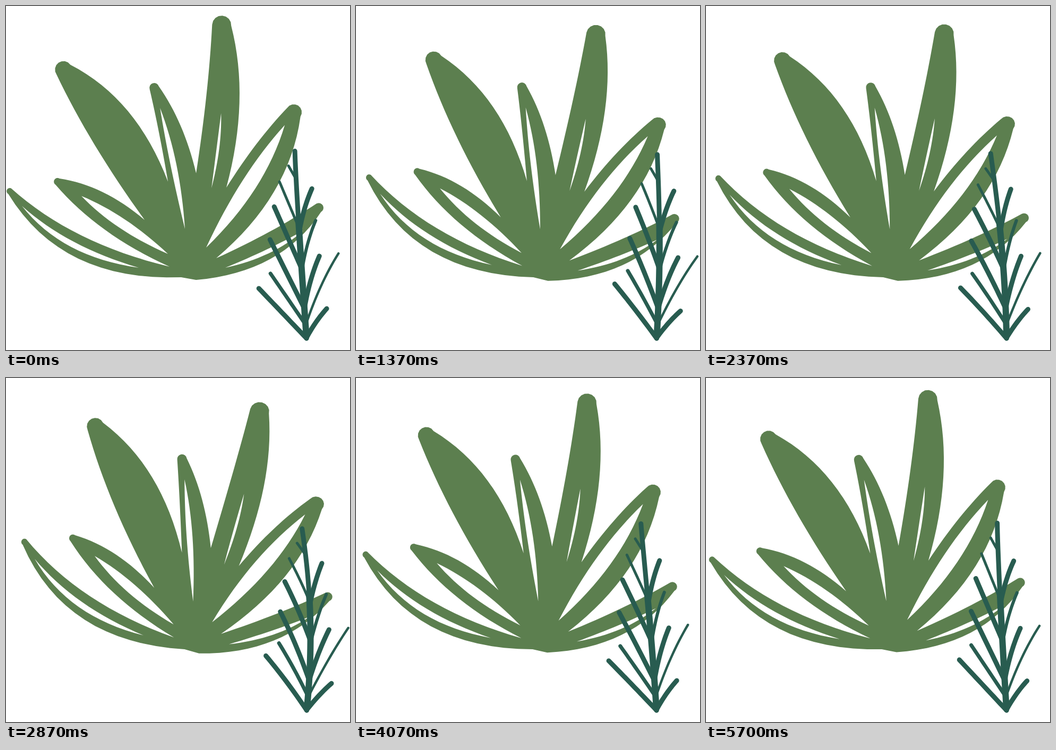
An HTML page for the animation above (5.73 s loop, 648 by 648 pixels).

```html
<!DOCTYPE html>
<html lang="en">
<head>
<meta charset="utf-8">
<title>Swaying plants</title>
<style>
  html, body { margin: 0; width: 100%; height: 100%; overflow: hidden; background: #fff; }
  svg { display: block; width: 100vw; height: 100vh; }
</style>
</head>
<body>
<svg viewBox="0 0 648 648">
  <path id="bush" fill="#5c7f4f"/>
  <path id="gaps" fill="#fff"/>
  <g id="sprig" fill="none" stroke="#285c50" stroke-linecap="round" stroke-linejoin="round"></g>
</svg>
<script>
const LOOP = 5730, FRAME = 1000 / 30;
const BUSH_PERIOD = 1800, SPRIG_PERIOD = 1930;

// Points where neighbouring leaves meet, clockwise from the foot.
const valleys = [[330, 511], [308, 491], [261, 403], [305, 331], [358, 315], [415, 342], [396, 475], [358, 516]];

// bends: bulge of the left and right edge as a share of the length, positive to the left.
const leaves = [
  { tip: [7, 349], radius: 6, bends: [0.29, 0.126], gap: { root: [250, 493], tip: [30, 377], bends: [0.2, 0.112] } },
  { tip: [97, 331], radius: 7, bends: [0.11, -0.14], gap: { root: [305, 467], tip: [142, 358], bends: [0.1, -0.09] } },
  { tip: [108, 120], radius: 16, bends: [0.045, -0.19] },
  { tip: [279, 154], radius: 9, bends: [-0.015, -0.095], gap: { root: [337, 420], tip: [290, 192], bends: [0.02, -0.075] } },
  { tip: [406, 36], radius: 18, bends: [-0.025, -0.13], gap: { root: [387, 343], tip: [405, 202], bends: [0, -0.07] } },
  { tip: [542, 200], radius: 15, bends: [0.05, -0.19], gap: { root: [377, 455], tip: [525, 224], bends: [0.075, -0.13] } },
  { tip: [589, 380], radius: 9, bends: [-0.04, -0.24], gap: { root: [413, 493], tip: [560, 423], bends: [-0.03, -0.13] } }
];

const twigs = [
  { tip: [476, 532], foot: 626, width: 9 },
  { tip: [498, 504], foot: 600, width: 7 },
  { tip: [497, 440], foot: 570, width: 9 },
  { tip: [505, 378], foot: 495, width: 9 },
  { tip: [515, 331], foot: 418, width: 5 },
  { tip: [532, 301], foot: 326, width: 5 },
  { tip: [576, 344], foot: 425, width: 9 },
  { tip: [583, 404], foot: 500, width: 6 },
  { tip: [590, 471], foot: 570, width: 9 },
  { tip: [626, 466], foot: 602, width: 4.5 },
  { tip: [604, 570], foot: 625, width: 9 }
];

// Points of a curve from a to b, fullest a little past the middle.
function bow(a, b, bend, steps = 16) {
  const dx = b[0] - a[0], dy = b[1] - a[1];
  const control = [a[0] + 0.55 * dx + bend * dy, a[1] + 0.55 * dy - bend * dx];
  return Array.from({ length: steps + 1 }, (_, i) => {
    const t = i / steps, s = 1 - t;
    return a.map((v, k) => s * s * v + 2 * s * t * control[k] + t * t * b[k]);
  });
}

// Up the left edge, round the tip, down the right edge.
function leafEdge({ tip, radius, bends }, left, right) {
  const heading = Math.atan2(tip[1] - (left[1] + right[1]) / 2, tip[0] - (left[0] + right[0]) / 2);
  const cap = Array.from({ length: 9 }, (_, i) => {
    const angle = heading + (i / 8 - 0.5) * Math.PI;
    return [tip[0] + radius * Math.cos(angle), tip[1] + radius * Math.sin(angle)];
  });
  return [...bow(left, cap[0], bends[0]), ...cap, ...bow(right, cap[8], bends[1]).reverse()];
}

function gapEdge({ root, tip, bends }) {
  return [...bow(root, tip, bends[0]), ...bow(root, tip, bends[1]).reverse()];
}

function stemPoint(y) {
  return [544 + 22 * Math.max(0, (y - 273) / 352) ** 1.2, y];
}

function stem(top, bottom) {
  return Array.from({ length: 21 }, (_, i) => stemPoint(top + (bottom - top) * i / 20));
}

const outline = leaves.flatMap((leaf, i) => leafEdge(leaf, valleys[i], valleys[i + 1]));
const gapOutlines = leaves.filter(leaf => leaf.gap).map(leaf => gapEdge(leaf.gap));

const strokes = [
  { width: 9, points: stem(273, 626) },
  { width: 12, points: stem(402, 615) },
  ...twigs.map(({ tip, foot, width }) => {
    const base = stemPoint(foot);
    return { width, points: bow(base, tip, tip[0] > base[0] ? 0.06 : 0) };
  })
];

// sway 0 is the left pose, 1 the right one.
function bushWarp(time) {
  const angle = (time - 35) / BUSH_PERIOD * 2 * Math.PI;
  const sway = (0.5 - 0.5 * Math.cos(angle) - 0.08 * Math.sin(angle) ** 3) / 0.94;
  return ([x, y]) => {
    const u = x - 360, h = 510 - y;
    return [
      x + sway * (6 + 0.09 * h + 0.0001 * h * h - 0.012 * u),
      y + sway * (3 + 0.098 * u + 0.00017 * u * h + 0.000066 * h * h)
    ];
  };
}

// The stem leans from its foot while the tip trails behind.
function sprigWarp(time) {
  const wave = peak => Math.cos((time - peak) / SPRIG_PERIOD * 2 * Math.PI);
  const lean = 0.0925 * (1 - wave(75));
  const curl = -0.0002 * (1 + wave(885));
  return ([x, y]) => {
    const u = x - 566, h = 628 - y;
    return [
      x + lean * h + curl * h * h,
      y + u * (lean + 2 * curl * h) + 0.00038 * lean * h * h
    ];
  };
}

function trace(points, warp) {
  return "M" + points.map(p => warp(p).map(v => v.toFixed(2)).join(" ")).join("L");
}

const bush = document.getElementById("bush");
const gaps = document.getElementById("gaps");
const sprig = document.getElementById("sprig");
for (const stroke of strokes) {
  stroke.path = document.createElementNS("http://www.w3.org/2000/svg", "path");
  stroke.path.setAttribute("stroke-width", stroke.width);
  sprig.append(stroke.path);
}

function draw(time) {
  const bend = bushWarp(time), lean = sprigWarp(time);
  bush.setAttribute("d", trace(outline, bend) + "Z");
  gaps.setAttribute("d", gapOutlines.map(points => trace(points, bend) + "Z").join(""));
  for (const { path, points } of strokes) path.setAttribute("d", trace(points, lean));
}

const start = performance.now();
function tick() {
  const time = (performance.now() - start) % LOOP;
  draw(Math.floor((time + 5) / FRAME) * FRAME);
  requestAnimationFrame(tick);
}
tick();
</script>
</body>
</html>
```
